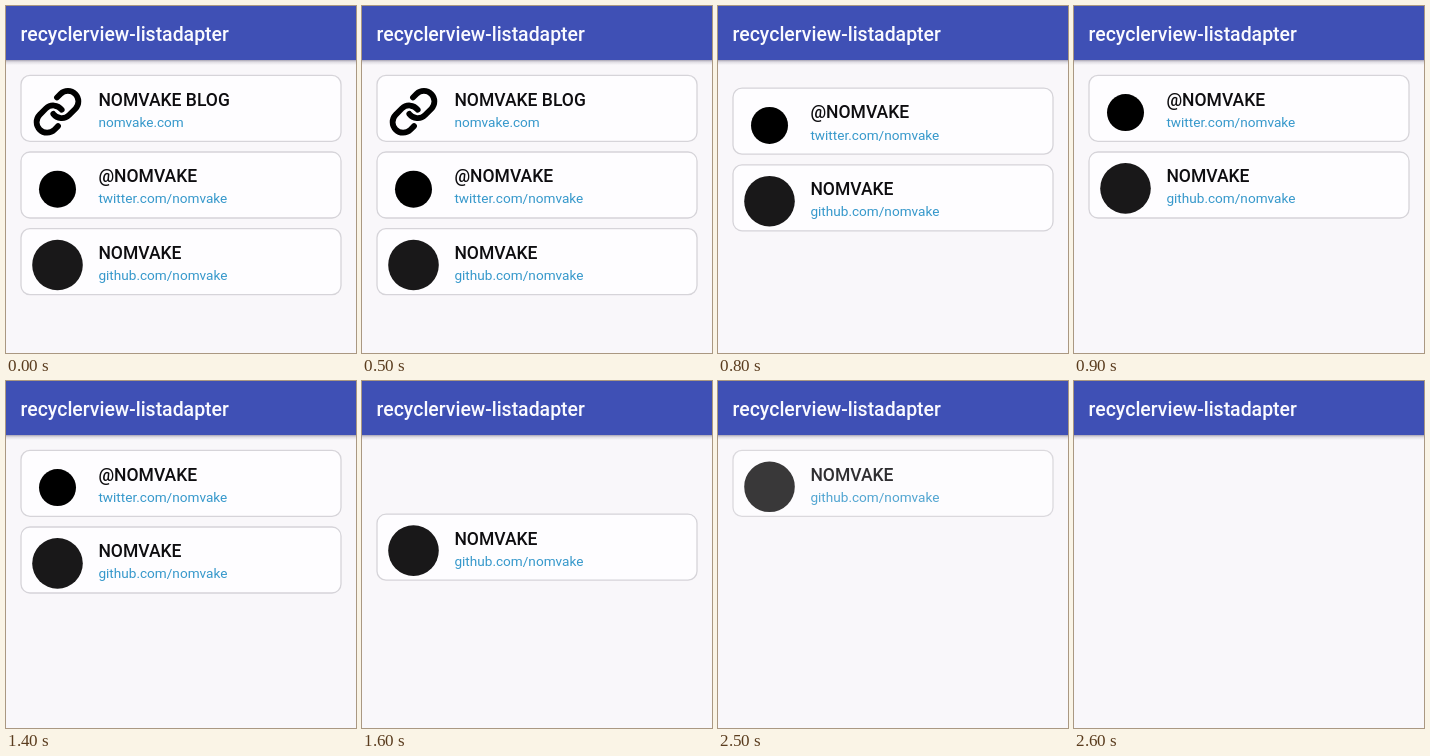
An HTML page for the animation above (2700 ms loop, 350 by 347 pixels).

```html
<!DOCTYPE html>
<html lang="en">
<head>
<meta charset="utf-8">
<title>recyclerview-listadapter</title>
<style>
  html, body { margin: 0; width: 100%; height: 100%; overflow: hidden; background: #f9f7fa; }
  svg { display: block; width: 100vw; height: 100vh; font-family: Roboto, sans-serif; }
  .bar { font-size: 19.44px; font-weight: 500; fill: #fafaff; }
  .name { font-size: 17.5px; font-weight: 500; fill: #0e0d10; }
  .url { font-size: 13.6px; fill: #3698cb; }
  .card { fill: #fefdff; stroke: #d6d4d9; stroke-width: 1.3; }
  .chain { fill: none; stroke: #000; stroke-width: 2.75; stroke-linecap: round; }
</style>
</head>
<body>
<svg viewBox="0 0 350 347">
  <defs>
    <linearGradient id="shade" x2="0" y2="1">
      <stop offset="0" stop-color="#55506a" stop-opacity=".5"/>
      <stop offset=".4" stop-color="#55506a" stop-opacity=".16"/>
      <stop offset="1" stop-color="#55506a" stop-opacity="0"/>
    </linearGradient>
    <path id="hook" d="M-2 1a5 5 0 0 0 7.54 .54l3-3a5 5 0 0 0-7.07-7.07l-1.72 1.71"/>
  </defs>
  <rect width="350" height="347" fill="#f9f7fa"/>
  <g id="list"></g>
  <rect y="54" width="350" height="5" fill="url(#shade)"/>
  <rect width="350" height="54" fill="#3f50b5"/>
  <text class="bar" x="14.6" y="34.8">recyclerview-listadapter</text>
</svg>
<script>
const LOOP = 2700, STEP = 100;
const FADE = 120, MOVE = 250;
const TOP = 69.4, PITCH = 76.6;

const chain = `
  <g class="chain" transform="translate(51.5 36.4) scale(2.1)">
    <use href="#hook"/>
    <use href="#hook" transform="rotate(180)"/>
  </g>`;
const dot = (y, r, color) => `<circle cx="51.5" cy="${y}" r="${r}" fill="${color}"/>`;

// removeAt: moment the row starts to fade out
const rows = [
  { name: 'NOMVAKE BLOG', url: 'nomvake.com', icon: chain, removeAt: 497 },
  { name: '@NOMVAKE', url: 'twitter.com/nomvake', icon: dot(37.2, 18.5, '#000'), removeAt: 1413 },
  { name: 'NOMVAKE', url: 'github.com/nomvake', icon: dot(36.4, 25.3, '#191819'), removeAt: 2470 }
];

const list = document.getElementById('list');
list.innerHTML = rows.map(row => `
  <g>
    <rect class="card" x="15" y="0" width="320" height="66" rx="9"/>
    ${row.icon}
    <text class="name" x="92.4" y="30.3">${row.name}</text>
    <text class="url" x="92.4" y="51.4">${row.url}</text>
  </g>`).join('');
const cards = [...list.children];

function ease(time, start, duration) {
  const p = Math.min(1, Math.max(0, (time - start) / duration));
  return (1 - Math.cos(Math.PI * p)) / 2;
}

function draw(time) {
  let y = TOP;
  rows.forEach(({ removeAt }, i) => {
    cards[i].setAttribute('transform', `translate(0 ${y.toFixed(2)})`);
    cards[i].setAttribute('opacity', 1 - ease(time, removeAt, FADE));
    y += PITCH * (1 - ease(time, removeAt + FADE, MOVE));
  });
}

const origin = performance.now();
function tick() {
  const time = (performance.now() - origin) % LOOP;
  draw(Math.floor(time / STEP) * STEP);
  requestAnimationFrame(tick);
}
tick();
</script>
</body>
</html>
```
